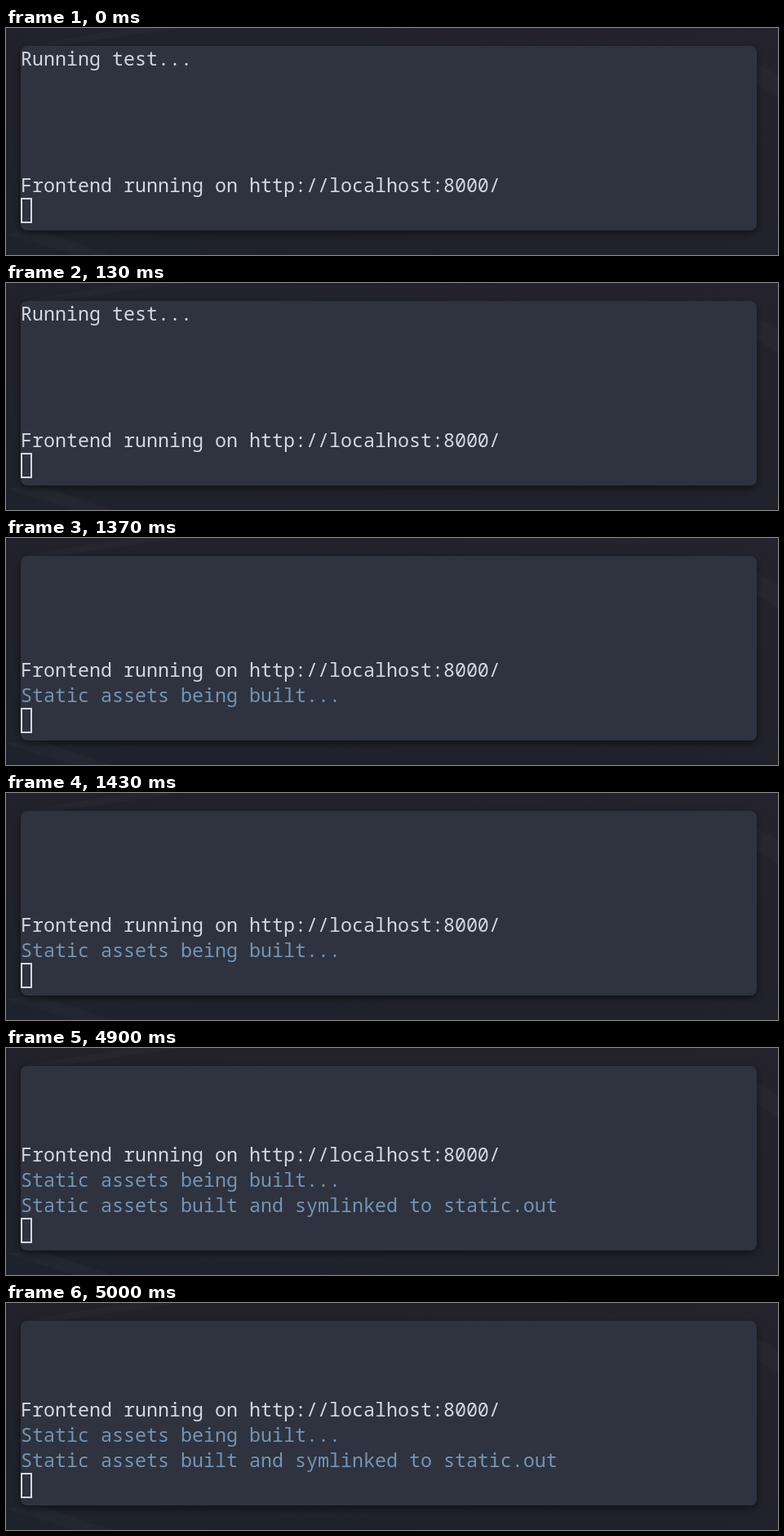
An HTML page for the animation above (7.71 s loop, 946 by 278 pixels).

```html
<!DOCTYPE html>
<html lang="en">
<head>
<meta charset="utf-8">
<title>Terminal log</title>
<style>
  html, body { margin: 0; width: 100%; height: 100%; overflow: hidden; background: #21212b; }
  svg { display: block; }
  text { font: 23.333px "Noto Sans Mono", monospace; fill: #d2d8e2; white-space: pre; }
  .info { fill: #7693b5; }
  .log { animation: scroll 7.71s step-end infinite; }
  /* one 31px row per new line, at 1300 ms and 4870 ms */
  @keyframes scroll {
    0% { transform: translateY(0); }
    16.861% { transform: translateY(-31px); }
    63.165%, 100% { transform: translateY(-62px); }
  }
</style>
</head>
<body>
<svg width="946" height="278" viewBox="0 0 946 278">
  <defs>
    <linearGradient id="wall" x1="0" y1="1" x2="1" y2="0">
      <stop offset="0" stop-color="#1d232d"/>
      <stop offset=".3" stop-color="#20212b"/>
      <stop offset="1" stop-color="#25232d"/>
    </linearGradient>
    <filter id="blur" x="-10%" y="-20%" width="120%" height="140%">
      <feGaussianBlur stdDeviation="5"/>
    </filter>
    <clipPath id="rows"><rect x="18" y="22" width="902" height="186"/></clipPath>
  </defs>

  <rect width="946" height="278" fill="url(#wall)"/>
  <g fill="#fff" fill-opacity=".02">
    <path d="M916 40L946 58V86L916 66Z"/>
    <path d="M40 248L130 278H84L0 252Z"/>
    <path d="M150 0H215L60 22H20Z"/>
  </g>

  <rect x="18" y="25" width="902" height="226" rx="8" fill="#000" fill-opacity=".55" filter="url(#blur)"/>
  <rect x="18" y="22" width="902" height="226" rx="8" fill="#2e333f"/>

  <g clip-path="url(#rows)">
    <g class="log">
      <text x="18" y="46">Running test...</text>
      <text x="18" y="201">Frontend running on http://localhost:8000/</text>
      <text x="18" y="232" class="info">Static assets being built...</text>
      <text x="18" y="263" class="info">Static assets built and symlinked to static.out</text>
    </g>
  </g>
  <rect x="19" y="209" width="12" height="29" fill="none" stroke="#d2d8e2" stroke-width="2"/>
</svg>
</body>
</html>
```
